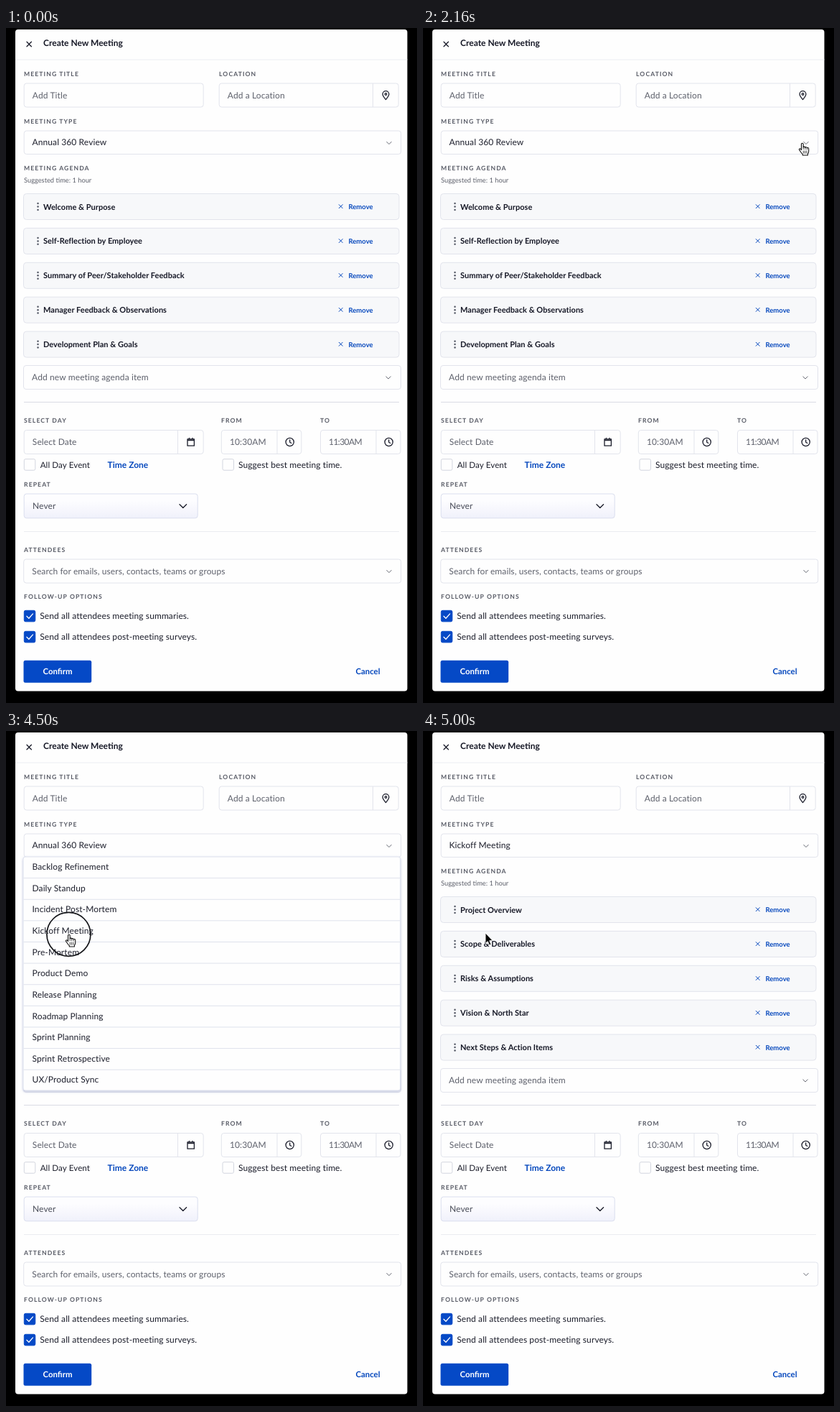
An HTML page for the animation above (8 s loop, 573 by 939 pixels).

```html
<!DOCTYPE html>
<html lang="en">
<head>
<meta charset="utf-8">
<title>Create New Meeting</title>
<style>
  html, body { margin: 0; width: 100%; height: 100%; overflow: hidden; background: #000; }
  svg { display: block; width: 573px; height: 939px; }
  text { font-family: Lato, "Open Sans", sans-serif; white-space: pre; text-rendering: geometricPrecision; }
  .body { font-size: 12px; letter-spacing: .1px; fill: #1d1f2c; }
  .hint { font-size: 12px; letter-spacing: .11px; fill: #5e616c; }
  .label { font-size: 8.6px; font-weight: 700; letter-spacing: 1.1px; fill: #575a65; }
  .small { font-size: 9.3px; fill: #5b5e69; }
  .title { font-size: 12px; font-weight: 700; fill: #161826; }
  .item { font-size: 11px; font-weight: 700; letter-spacing: .03px; fill: #161826; }
  .link { font-size: 12px; font-weight: 700; fill: #0648bd; }
  .remove { font-size: 9.5px; font-weight: 700; fill: #0648bd; }
  .button { font-size: 11.4px; font-weight: 700; }
  .field { fill: #fefefe; stroke: #e2e4ec; }
  .line { fill: none; stroke: #e2e4ec; }
  .icon { fill: none; stroke: #1a1c2a; stroke-width: 1.3; stroke-linecap: round; stroke-linejoin: round; }
  .chevron { fill: none; stroke: #62656f; stroke-linecap: round; stroke-linejoin: round; }
</style>
</head>
<body>
<svg id="stage" viewBox="0 0 573 939">
  <defs>
    <linearGradient id="selectFill" x2="0" y2="1">
      <stop offset=".3" stop-color="#fdfdff"/><stop offset="1" stop-color="#f0f1fb"/>
    </linearGradient>
    <filter id="shadow" x="-5%" y="-5%" width="110%" height="112%">
      <feDropShadow dx="0" dy="1.5" stdDeviation="1.5" flood-color="#8d97c4" flood-opacity=".55"/>
    </filter>
  </defs>
  <rect width="573" height="939"/>
  <g id="form"></g>
  <path id="dim" fill="#001412" fill-rule="evenodd"/>
  <g id="menu"></g>
  <circle id="ring" r="30.5" fill="none" stroke="#15161a" stroke-width="1.7"/>
  <path id="arrow" d="M0 0V14.6L3.2 11.6L5.6 17L8 16L5.7 10.7H10.2Z" fill="#050505" stroke="#fff" stroke-width=".9" stroke-linejoin="round"/>
  <g id="hand" fill="#fff" stroke="#111" stroke-width="1.1" stroke-linecap="round" stroke-linejoin="round">
    <path d="M-1.5 9.6V1.5Q-1.5 .3 -.2 .3T1.2 1.5V6Q1.4 5 2.6 5.1T3.8 6.4Q4.2 5.5 5.2 5.7T6.4 7Q6.9 6.3 7.8 6.6T8.7 8V11.5Q8.7 13.6 7.4 15V17H.3V15.6Q-1.5 14 -2.5 12.2L-4.5 9.4Q-4.9 8.3 -4 7.9T-2.4 8.5Z"/>
    <path d="M1.2 6V8.6M3.8 6.6V8.8M6.4 7.2V9M1.3 11V14.3M3.6 11V14.3M5.9 11V14.3" stroke-width=".8"/>
  </g>
</svg>
<script>
const LOOP = 8000;
const $ = id => document.getElementById(id);
const esc = s => s.replace(/&/g, "&amp;");

const text = (cls, x, y, s, extra = "") => `<text class="${cls}" x="${x}" y="${y}" ${extra}>${esc(s)}</text>`;
const box = (x, y, w, h, rx = 3.5, extra = "") =>
  `<rect class="field" x="${x}" y="${y}" width="${w}" height="${h}" rx="${rx}" ${extra}/>`;
const path = (cls, d, extra = "") => `<path class="${cls}" d="${d}" ${extra}/>`;
const chevron = (x, y) => path("chevron", `M${x - 3.2} ${y - 1.6}l3.2 3.2l3.2-3.2`);
const label = (x, y, s) => text("label", x, y + 3.2, s);

function input(x, y, w, hint, split, extra) {
  const line = split ? path("line", `M${split} ${y}v33`) : "";
  return box(x, y, w, 33) + line + text("hint", x + 11.6, y + 20.8, hint, extra);
}

function clock(x, y) {
  return `<circle class="icon" cx="${x}" cy="${y}" r="5.6"/>` + path("icon", `M${x} ${y - 3.2}v3.4l2.2 1.3`);
}

function checkbox(x, y, on) {
  const style = on ? 'style="fill:#0549c6;stroke:#0549c6"' : 'style="stroke:#d3d6df"';
  const tick = on ? path("icon", `M${x + 3.6} ${y + 8}l3 3l5.6-6.4`, 'style="stroke:#fff"') : "";
  return box(x, y, 15.5, 15.5, 2, style) + tick;
}

function agendaRow(i) {
  const y = 230.5 + i * 47.9, mid = y + 18;
  const dots = [-4.4, 0, 4.4].map(d => `<circle cx="44.5" cy="${mid + d}" r="1.25" fill="#555966"/>`).join("");
  return box(24.5, y, 523.5, 36, 4, 'style="fill:#f7f8fa"') + dots +
    text("item agenda", 52, mid + 4, "") +
    path("icon", `M464.2 ${mid - 2.8}l5 5m0-5l-5 5`, 'style="stroke:#0648bd;stroke-width:1"') +
    text("remove", 477.5, mid + 3.4, "Remove");
}

$("form").innerHTML = [
  '<rect x="13" y="2" width="546.5" height="920.5" rx="4" fill="#fefefe"/>',
  path("icon", "M29 19.3l6.4 6.4m0-6.4l-6.4 6.4"),
  text("title", 52, 25.4, "Create New Meeting"),
  path("line", "M13 44H559.5", 'style="stroke:#eceef2"'),

  label(25, 63.5, "MEETING TITLE"),
  input(25.2, 77, 250, "Add Title"),
  label(297, 63.5, "LOCATION"),
  input(297.2, 77, 250, "Add a Location", 511.5),
  path("icon", "M529.5 99.6C527 96.5 525.1 94.5 525.1 92a4.4 4.4 0 0 1 8.8 0C533.9 94.5 532 96.5 529.5 99.6Z"),
  '<circle class="icon" cx="529.5" cy="92" r="1.3"/>',

  label(25, 129.5, "MEETING TYPE"),
  box(25.2, 143, 525.5, 32.5),
  '<text id="type" class="body" x="36.5" y="163.4"></text>',
  chevron(534, 160),

  label(25, 195, "MEETING AGENDA"),
  text("small", 25, 215, "Suggested time: 1 hour"),
  [0, 1, 2, 3, 4].map(agendaRow).join(""),
  input(24.5, 469.5, 526, "Add new meeting agenda item"),
  chevron(533, 486.5),
  path("line", "M25 520.5H548", 'style="stroke:#d9dce4"'),

  label(25, 546, "SELECT DAY"),
  input(25.2, 559.5, 250, "Select Date", 239.5),
  path("icon", "M253 572h9.4v9.2h-9.4ZM253 573.6h9.4M255.4 570.4v1.4M260 570.4v1.4"),
  label(300, 546, "FROM"),
  input(300.3, 559.5, 111.5, "10:30AM", 378),
  clock(395.7, 576),
  label(438, 546, "TO"),
  input(438.5, 559.5, 111.5, "11:30AM", 516, 'style="letter-spacing:-.6px"'),
  clock(533.7, 576),

  checkbox(25.3, 599.7),
  text("body", 47.7, 611.5, "All Day Event", 'style="font-size:11.6px"'),
  text("link", 141.6, 611.5, "Time Zone"),
  checkbox(302, 599.7),
  text("body", 324, 611.5, "Suggest best meeting time."),

  label(25, 635, "REPEAT"),
  box(25.2, 648, 242, 33.8, 3.5, 'style="fill:url(#selectFill);stroke:#dadeee"'),
  text("body", 37, 669, "Never", 'style="fill:#4b4e5a"'),
  path("icon", "M242 662.7l4.8 4.8l4.8-4.8"),
  path("line", "M25 700.5H548", 'style="stroke:#eaecf0"'),

  label(25, 726, "ATTENDEES"),
  input(24.7, 739, 526, "Search for emails, users, contacts, teams or groups"),
  chevron(534, 756),

  label(25, 791, "FOLLOW-UP OPTIONS"),
  checkbox(25.3, 810.3, true),
  text("body", 47.3, 822.3, "Send all attendees meeting summaries."),
  checkbox(25.3, 839.3, true),
  text("body", 47.3, 851.3, "Send all attendees post-meeting surveys."),

  '<rect x="24.5" y="879.8" width="94.7" height="31" rx="2.5" fill="#0549c6"/>',
  text("button", 72, 899, "Confirm", 'text-anchor="middle" fill="#fff"'),
  text("button", 504.5, 899, "Cancel", 'text-anchor="middle" fill="#0648bd"')
].join("");

const TYPES = ["Backlog Refinement", "Daily Standup", "Incident Post-Mortem", "Kickoff Meeting",
  "Pre-Mortem", "Product Demo", "Release Planning", "Roadmap Planning", "Sprint Planning",
  "Sprint Retrospective", "UX/Product Sync"];
const ROW = 29.62;
$("menu").innerHTML =
  box(24, 175, 525.8, 325, 3, 'filter="url(#shadow)" style="stroke:#dde1ee"') +
  TYPES.map((s, i) =>
    (i ? path("line", `M24.5 ${175 + i * ROW}H549.5`, 'style="stroke:#dfe2ec"') : "") +
    text("body", 36.5, 193.2 + i * ROW, s)).join("");

const MEETINGS = [
  { type: "Annual 360 Review", agenda: ["Welcome & Purpose", "Self-Reflection by Employee",
    "Summary of Peer/Stakeholder Feedback", "Manager Feedback & Observations", "Development Plan & Goals"] },
  { type: "Kickoff Meeting", agenda: ["Project Overview", "Scope & Deliverables",
    "Risks & Assumptions", "Vision & North Star", "Next Steps & Action Items"] }
];
const agendaTexts = document.querySelectorAll(".agenda");
let current;
function setMeeting(meeting) {
  if (meeting === current) return;
  current = meeting;
  $("type").textContent = meeting.type;
  meeting.agenda.forEach((s, i) => agendaTexts[i].textContent = s);
}

// Pointer path: [tick, x, y], six ticks per second
const POINTER = [[3, 378, 530], [5, 388, 509], [7, 505, 250], [8, 508, 174], [9, 520, 166],
  [10, 528.8, 160], [13, 529, 160], [15, 530.5, 162], [18, 530, 162], [19, 520, 170],
  [20, 429, 218], [21, 229, 284], [22, 149, 288], [23, 86, 286], [24, 88, 283],
  [27, 88, 283], [28, 87, 281]];

function pointerAt(tick) {
  const i = POINTER.findIndex(p => p[0] > tick);
  if (i < 0) return POINTER[POINTER.length - 1].slice(1);
  if (i === 0) return POINTER[0].slice(1);
  const [a, ax, ay] = POINTER[i - 1], [b, bx, by] = POINTER[i];
  const k = (tick - a) / (b - a);
  return [ax + (bx - ax) * k, ay + (by - ay) * k];
}

// The dimming leaves the open menu's area clear
const CARD = "M13 2H559.5V922.5H13Z";
const MENU_HOLE = "M24 175H549.8V500H24Z";

const show = (id, on) => $(id).setAttribute("visibility", on ? "visible" : "hidden");
const place = (id, x, y) => $(id).setAttribute("transform", `translate(${x} ${y})`);
const within = (tick, from, to) => tick >= from && tick < to;

function render(ms) {
  const tick = Math.floor((ms + 6.7) * 0.006);
  const [x, y] = pointerAt(tick);
  const isHand = within(tick, 10, 17) || within(tick, 24, 28);
  const menuOpen = within(tick, 17, 29);

  setMeeting(MEETINGS[tick < 29 ? 0 : 1]);
  show("menu", menuOpen);
  $("menu").setAttribute("opacity", tick === 28 ? 0.82 : 1);
  $("dim").setAttribute("d", menuOpen ? CARD + MENU_HOLE : CARD);
  $("dim").setAttribute("opacity", tick === 28 ? 0.125 : tick === 29 ? 0.06 : 0);

  show("arrow", tick >= 3 && !isHand);
  show("hand", isHand);
  place("arrow", x, y);
  place("hand", x, y);

  show("ring", tick === 15 || tick === 27);
  place("ring", x - 0.6, y - 0.2);
}

const start = performance.now();
function frame() {
  render((performance.now() - start) % LOOP);
  requestAnimationFrame(frame);
}
frame();
</script>
</body>
</html>
```
